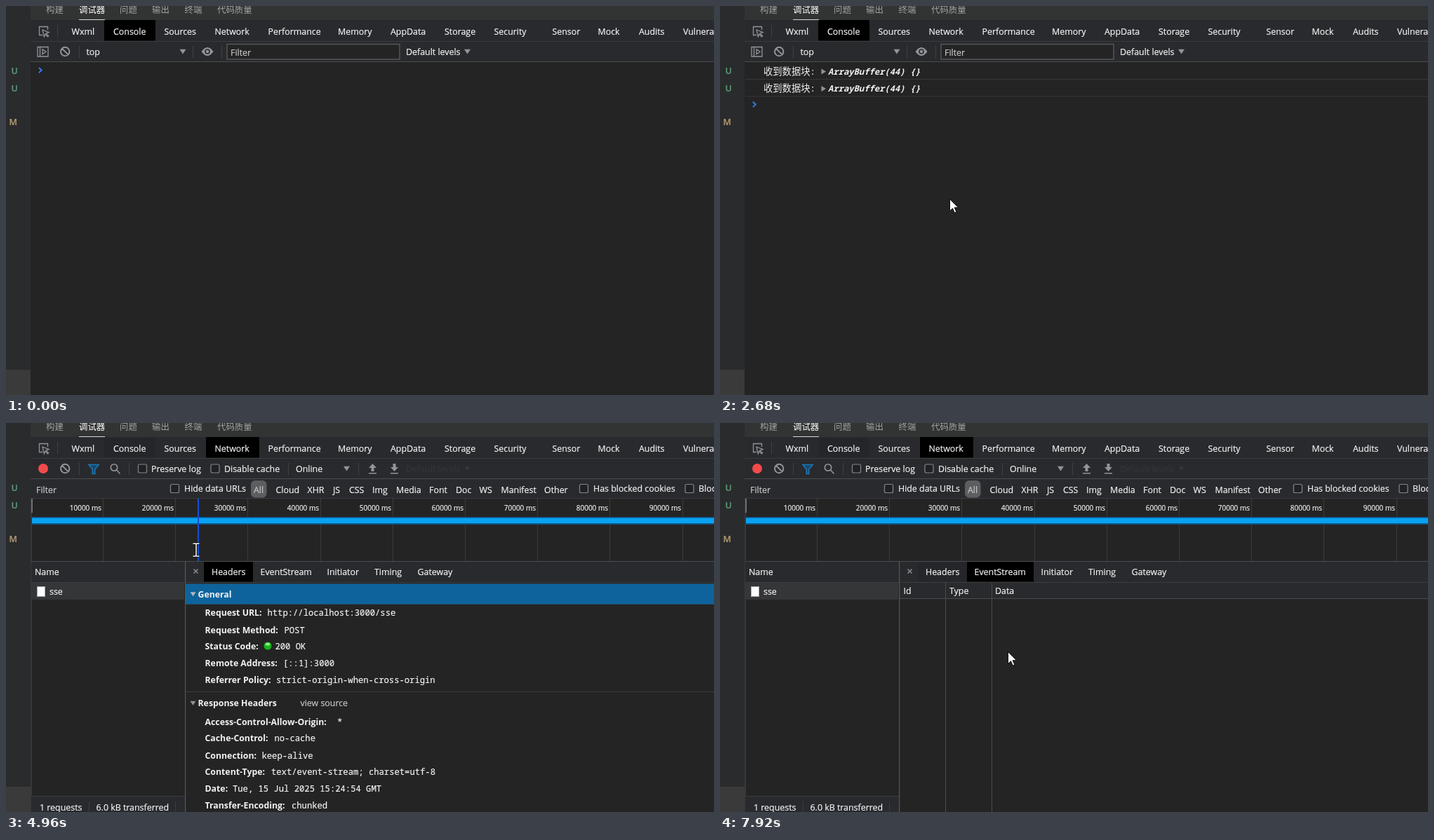
Animation, 1009 px wide and 555 px high, one loop 8 s. Source, as an HTML page:

```html
<!DOCTYPE html>
<html lang="zh">
<head>
<meta charset="utf-8">
<title>Debugger panel</title>
<style>
html, body { margin: 0; width: 100%; height: 100%; overflow: hidden; background: #242424; }
svg { display: block; width: 100%; height: 100%; }
text {
  font: 12.4px "Open Sans", "Noto Sans", sans-serif; white-space: pre;
  color: #f2f2f3; fill: currentColor; stroke: currentColor; stroke-width: .2px;
}
.cjk { font: 12.4px "Noto Sans CJK SC", "Noto Sans CJK", sans-serif; color: #a3a3a3; stroke: none; }
.on { font-weight: 500; color: #fff; }
.log { font: 13.3px "Noto Sans CJK SC", "Noto Sans CJK", sans-serif; stroke: none; }
.mono { font: 12.2px "Noto Sans Mono", "DejaVu Sans Mono", monospace; }
.obj { font-weight: 700; font-style: italic; stroke: none; }
.bold { font-weight: 700; font-size: 12.3px; stroke: none; }
.small { font-size: 10px; text-anchor: end; }
.dim { color: #c6c7c8; }
.tip { color: #8b8b8b; stroke: none; }
.ghost { color: #353639; stroke: none; }
.green { color: #5b9b78; font-weight: 600; }
.tan { color: #b39a72; font-weight: 600; }
.icon { fill: none; stroke: #929497; stroke-width: 1.6; }
.thin { stroke-width: 1.3; }

.show { animation: 8s step-end infinite; }
.console { animation-name: console; }
.network { animation-name: network; }
.log1 { animation-name: log1; }
.log2 { animation-name: log2; }
.log3 { animation-name: log3; }
.prompt { animation: prompt 8s step-end infinite; }
.hint { animation-name: hint; }
.hover { animation-name: hover; }
.focus { animation-name: focus; }
.headers { animation-name: headers; }
.events { animation-name: events; }
.arrow { animation-name: arrow; }
.hand { animation-name: hand; }
.beam { animation-name: beam; }
.marker { animation-name: marker; }
.marker line { animation: slide 8s steps(3) infinite; }
.pointer { animation: move 8s steps(3) infinite; }

@keyframes console { from { opacity: 1 } 52.1%, to { opacity: 0 } }
@keyframes network { from { opacity: 0 } 52.1%, to { opacity: 1 } }
@keyframes log1 { from { opacity: 0 } .375%, to { opacity: 1 } }
@keyframes log2 { from { opacity: 0 } 24.375%, to { opacity: 1 } }
@keyframes log3 { from { opacity: 0 } 49.1%, to { opacity: 1 } }
@keyframes prompt {
  from { transform: none }
  .375% { transform: translateY(24.4px) }
  24.375% { transform: translateY(48.8px) }
  49.1%, to { transform: translateY(73.2px) }
}
@keyframes hint { from { opacity: 0 } 43.3% { opacity: 1 } 46.2%, to { opacity: 0 } }
@keyframes hover { from { opacity: 0 } 44.1%, to { opacity: 1 } }
@keyframes focus { from { opacity: 0 } 53.4%, to { opacity: 1 } }
@keyframes headers { from { opacity: 1 } 87.9%, to { opacity: 0 } }
@keyframes events { from { opacity: 0 } 87.9%, to { opacity: 1 } }
@keyframes arrow {
  from { opacity: 0 } .375% { opacity: 1 } 41.5% { opacity: 0 } 54% { opacity: 1 }
  57% { opacity: 0 } 63% { opacity: 1 } 81.5% { opacity: 0 } 91.5%, to { opacity: 1 }
}
@keyframes hand {
  from { opacity: 0 } 44.1% { opacity: 1 } 54% { opacity: 0 }
  81.5% { opacity: 1 } 91.5%, to { opacity: 0 }
}
@keyframes beam {
  from { opacity: 0 } 41.5% { opacity: 1 } 44.1% { opacity: 0 }
  57% { opacity: 1 } 63%, to { opacity: 0 }
}
@keyframes marker { from { opacity: 0 } 57% { opacity: 1 } 62.9%, to { opacity: 0 } }
@keyframes slide {
  0%, 57% { transform: translateX(301px) }
  60.4% { transform: translateX(278px) }
  61.9%, to { transform: translateX(274px) }
}
@keyframes move {
  0%, .375% { transform: translate(433px, 4px) }
  2.94% { transform: translate(303px, 183px) }
  5.5%, 6.4% { transform: translate(274px, 287px) }
  9.3% { transform: translate(272px, 312px) }
  12.2% { transform: translate(275px, 348px) }
  15% { transform: translate(285px, 394px) }
  17%, 17.5% { transform: translate(286px, 392px) }
  20.5%, 30.1% { transform: translate(294px, 372px) }
  32.6% { transform: translate(318px, 300px) }
  35.25% { transform: translate(345px, 225px) }
  37.75% { transform: translate(362px, 140px) }
  40.25%, 40.6% { transform: translate(367px, 77px) }
  43% { transform: translate(362px, 60px) }
  45% { transform: translate(353px, 44px) }
  47.75% { transform: translate(345px, 36px) }
  50.9%, 52.5% { transform: translate(335px, 32px) }
  55.1% { transform: translate(322px, 75px) }
  57.75% { transform: translate(295px, 130px) }
  60.4% { transform: translate(275px, 172px) }
  61.9%, 62% { transform: translate(271px, 181px) }
  65% { transform: translate(285px, 240px) }
  67.75% { transform: translate(315px, 295px) }
  69.5% { transform: translate(332px, 310px) }
  71.5%, 71.9% { transform: translate(342px, 281px) }
  75.1%, 75.3% { transform: translate(372px, 256px) }
  78.6% { transform: translate(382px, 240px) }
  82%, 82.4% { transform: translate(385px, 225px) }
  85% { transform: translate(395px, 212px) }
  89.6%, 90.6% { transform: translate(401px, 204px) }
  93.1% { transform: translate(412px, 240px) }
  96% { transform: translate(424px, 290px) }
  98.9%, to { transform: translate(410px, 326px) }
}
</style>
</head>
<body>
<svg id="stage" viewBox="0 0 1009 555" preserveAspectRatio="none"></svg>
<script>
const BAR = '#292a2d', LINE = '#494c50', SOFT = '#3b3c3e', GREY = '#929497';

const rect = (x, y, w, h, fill, extra = '') =>
  `<rect x="${x}" y="${y}" width="${w}" height="${h}" fill="${fill}" ${extra}/>`;
const text = (x, y, str, cls = '') => `<text x="${x}" y="${y}" class="${cls}">${str}</text>`;
const path = (d, extra = 'class="icon"') => `<path d="${d}" ${extra}/>`;
const show = (name, ...parts) => `<g class="show ${name}">${parts.join('')}</g>`;
const row = (y, items, cls) => items.map(([x, str]) => text(x, y, str, cls)).join('');
const hline = (x, y, w, fill = LINE) => rect(x, y, w, 1, fill);
const vline = (x, y, h, fill = LINE) => rect(x, y, 1, h, fill);
const seps = (...xs) => xs.map(x => vline(x, 57, 17, '#3f4144')).join('');
const down = (x, y, r = 4.5, fill = GREY) =>
  path(`M${x - r} ${y - r * .7}h${2 * r}l${-r} ${r * 1.5}z`, `fill="${fill}"`);
const check = (x, y) =>
  rect(x + .5, y + .5, 12, 12, '#202124', 'rx="2" stroke="#85878a" stroke-width="1.2"');
const ban = path('M78 65a6.2 6.2 0 1 0 12.4 0a6.2 6.2 0 1 0 -12.4 0M79.8 60.6l8.8 8.8',
  'class="icon" style="stroke-width:2"');

const chrome = [
  rect(0, 0, 1009, 555, '#242424'),
  rect(0, 0, 35, 555, '#2a2b2d'),
  rect(0, 519, 35, 36, '#3a3a3b'),
  text(7.5, 97, 'U', 'green'), text(7.5, 121.5, 'U', 'green'), text(4.5, 170, 'M', 'tan'),
  rect(35, 0, 974, 20, '#323333'),
  row(10, [[57, '构建'], [162, '问题'], [208, '输出'], [254.5, '终端'], [301, '代码质量']], 'cjk'),
  text(104, 10, '调试器', 'cjk on'), rect(104, 19, 37, 1.2, '#d8d8d8'),
  rect(35, 20, 974, 60, BAR), hline(35, 50, 974, SOFT), hline(35, 79, 974),
  path('M52 41.5h-4.5v-12h12v4.5M52 34l9 3.6l-3.8 1.5l3.4 3.6l-1.2 1.1l-3.5 -3.6l-1.6 3.6z',
    'class="icon thin"'),
  vline(73, 27, 17, '#3f4144'),
];

const message = (name, y) => show(name,
  text(62, y + 14, '收到数据块', 'log'), text(128.6, y + 14, ':', 'mono'),
  path(`M144.5 ${y + 5.5}v8l6.5 -4z`, `fill="${GREY}"`),
  text(154, y + 14, 'ArrayBuffer(44) {}', 'mono obj'),
  hline(36, y + 20, 973, '#37383a'));

const consoleView = show('console',
  rect(140, 20, 73, 29.5, '#000'),
  show('hover', rect(285, 21, 76, 28.5, '#222326')),
  path('M45 58.5h15v13.5h-15zM48.5 58v14M52 61.8v7l5 -3.5z', 'class="icon thin"'),
  ban, seps(104, 266, 307),
  text(114.5, 70, 'top'), down(252, 65),
  path('M278.5 65q8.5 -12 17 0q-8.5 12 -17 0z', `fill="${GREY}"`),
  `<circle cx="287" cy="65" r="3" fill="${GREY}" stroke="${BAR}" stroke-width="1.6"/>`,
  rect(315, 54.5, 246, 21.5, '#242424', 'stroke="#5b5c5e" stroke-width="1.3"'),
  text(320, 70.5, 'Filter', 'dim'),
  text(570, 70, 'Default levels'), down(657.5, 65),
  message('log1', 84), message('log2', 108.4), message('log3', 132.8),
  path('M46.8 88l4 3.6l-4 3.6', 'class="prompt" fill="none" stroke="#367cf1" stroke-width="1.9"'),
  show('hint', rect(375, 86, 185, 23, '#222'),
    text(384, 101.5, 'e.g. /event\\d/ -cdn url:a.com', 'tip')));

const ticks = Array.from({ length: 9 }, (_, i) => {
  const x = Math.round(138 + i * 103.2);
  return vline(x, 108, 89, '#3a3b3d') + text(x - 2, 124.5, `${i + 1}0000 ms`, 'small');
}).join('');

const networkTop = [
  rect(140, 21, 73, 28.5, '#252629'),
  rect(285, 20, 76, 29.5, '#000'),
  '<circle cx="53" cy="65" r="7" fill="#f14a4a"/>',
  ban, seps(104, 175, 402, 502),
  path('M118 59.5h14l-5.3 6.5v6.5h-3.4v-6.5z', 'fill="#17476b" stroke="#1a78b8" stroke-width="1.6"'),
  path('M149.3 63.5a4.7 4.7 0 1 0 9.4 0a4.7 4.7 0 1 0 -9.4 0M157.5 67l5 5.5'),
  check(188, 58.5), check(291.5, 58.5),
  row(70, [[207, 'Preserve log'], [311, 'Disable cache'], [413, 'Online']]),
  down(485.5, 65),
  path('M522.5 58l5.5 6h-3.5v5h-4v-5h-3.5zM517 71h11v1.5h-11z', `fill="${GREY}"`),
  path('M553.5 69l5.5 -6h-3.5v-5h-4v5h-3.5zM548 71h11v1.5h-11z', `fill="${GREY}"`),
  text(570, 70, 'Default levels', 'ghost'), down(657.5, 65, 4, '#353639'),
  rect(35, 80, 974, 27, BAR), hline(35, 107, 974, SOFT),
  text(43, 100, 'Filter', 'dim'),
  check(234, 87), check(817, 87), check(967.5, 87),
  row(98, [[254, 'Hide data URLs'], [837, 'Has blocked cookies'], [987, 'Blocked Requests']]),
  rect(349, 82, 22.5, 24.5, '#5d5e60', 'rx="6"'), text(353, 100, 'All', 'dim'),
  row(100, [[384.5, 'Cloud'], [429.5, 'XHR'], [466, 'JS'], [489, 'CSS'], [522, 'Img'], [556, 'Media'],
    [603, 'Font'], [641, 'Doc'], [674.5, 'WS'], [705.5, 'Manifest'], [767, 'Other']]),
  ticks, vline(35.5, 108, 447), rect(36, 108, 2, 20, '#6d6f72'),
  rect(37, 134, 972, 11, '#0e5486'), rect(37, 135.5, 972, 7.5, '#0aa2f2'),
  show('marker', '<line y1="108" y2="197" stroke="#1450d8" stroke-width="2"/>'),
];

const requestList = [
  rect(36, 198, 973, 29, BAR), hline(36, 197, 973), hline(36, 227, 973, SOFT),
  text(41, 217, 'Name'),
  rect(37, 228, 217, 24, '#353638'),
  rect(44.5, 233.5, 11, 14, '#fff', 'stroke="#a8a8a8"'), text(62, 245, 'sse'),
  rect(36, 532, 219, 23, BAR), hline(36, 532, 219, SOFT),
  vline(118, 540, 15, SOFT), vline(241, 540, 15, SOFT),
  row(553, [[48, '1 requests'], [128.5, '6.0 kB transferred']]),
];

const fields = [
  [275, 'Request URL:', 372.5, 'http://localhost:3000/sse'],
  [299.5, 'Request Method:', 396.5, 'POST'],
  [323, 'Status Code:', 383.5, '200 OK'],
  [347, 'Remote Address:', 395, '[::1]:3000'],
  [371, 'Referrer Policy:', 385, 'strict-origin-when-cross-origin'],
  [430.5, 'Access-Control-Allow-Origin:', 472, '*'],
  [454, 'Cache-Control:', 382.5, 'no-cache'],
  [478.5, 'Connection:', 364.5, 'keep-alive'],
  [502, 'Content-Type:', 378, 'text/event-stream; charset=utf-8'],
  [526, 'Date:', 323, 'Tue, 15 Jul 2025 15:24:54 GMT'],
  [550, 'Transfer-Encoding:', 407, 'chunked'],
].map(([y, key, x, value]) => text(283.5, y, key, 'bold') + text(x, y, value, 'mono')).join('');

const headersView = show('headers',
  rect(282, 198, 70, 28.5, '#000'),
  rect(256, 229.5, 753, 29, '#484848'),
  show('focus', rect(256, 229.5, 753, 29, '#0e639c')),
  down(266.5, 244, 4, '#b5b7ba'), text(273.5, 248.5, 'General', 'bold'),
  fields,
  '<circle cx="373" cy="318" r="5.5" fill="#19b51c"/>',
  '<ellipse cx="373" cy="315.5" rx="3.2" ry="2" fill="#8fee83"/>',
  hline(256, 383, 753, SOFT),
  down(266.5, 399.5, 4), text(273.5, 404, 'Response Headers', 'bold'),
  text(419.5, 404, 'view source', 'dim'));

const eventsView = show('events',
  rect(282, 198, 70, 28.5, '#252629'),
  rect(352, 198, 95, 28.5, '#000'),
  rect(256, 228, 753, 22, BAR), hline(256, 250, 753),
  vline(321, 228, 327), vline(387, 228, 327),
  row(243.5, [[261.5, 'Id'], [327, 'Type'], [392, 'Data']]));

const networkView = show('network', ...networkTop, ...requestList, headersView, eventsView,
  rect(255, 197, 1.2, 358, '#55575a'),
  path('M267.5 208.5l6 6m0 -6l-6 6', 'class="icon thin"'),
  row(217, [[293, 'Headers'], [362.5, 'EventStream'], [457.5, 'Initiator'], [525, 'Timing'], [586.5, 'Gateway']]));

const tabs = row(40.5, [[93.5, 'Wxml'], [153, 'Console'], [225.5, 'Sources'], [297.5, 'Network'],
  [373.5, 'Performance'], [473, 'Memory'], [548, 'AppData'], [625, 'Storage'], [695.5, 'Security'],
  [778.5, 'Sensor'], [843.5, 'Mock'], [902, 'Audits'], [965, 'Vulnerability']]);

const ink = 'fill="#fff" stroke="#111" stroke-width="1" stroke-linejoin="round"';
const beamShape = 'M-4.5 -9h3.5l1 .8l1 -.8h3.5M-4.5 9h3.5l1 -.8l1 .8h3.5M0 -8.5v17';
const pointer = `<g class="pointer">${[
  show('arrow', path('M.5 .5v17l4 -3.8l2.8 6.3l2.6 -1.2l-2.8 -6.1h5.4z', ink)),
  show('hand', path('M-2 2c0 -2.6 4 -2.6 4 0v6c.5 -1.4 2.8 -1 3 .6c.5 -1.3 2.7 -.8 2.8 .8' +
    'c.5 -1 2.7 -.5 2.7 1.5v4.5c0 3 -2 4.5 -2.3 7.1h-8c-.5 -3 -3.5 -5 -5.2 -9c-.6 -2.2 1.6 -2.8 3 -.8z', ink)),
  show('beam', path(beamShape, 'fill="none" stroke="#111" stroke-width="3.4"'),
    path(beamShape, 'fill="none" stroke="#fff" stroke-width="1.5"')),
].join('')}</g>`;

document.getElementById('stage').innerHTML =
  [...chrome, consoleView, networkView, tabs, pointer].join('');
</script>
</body>
</html>
```
